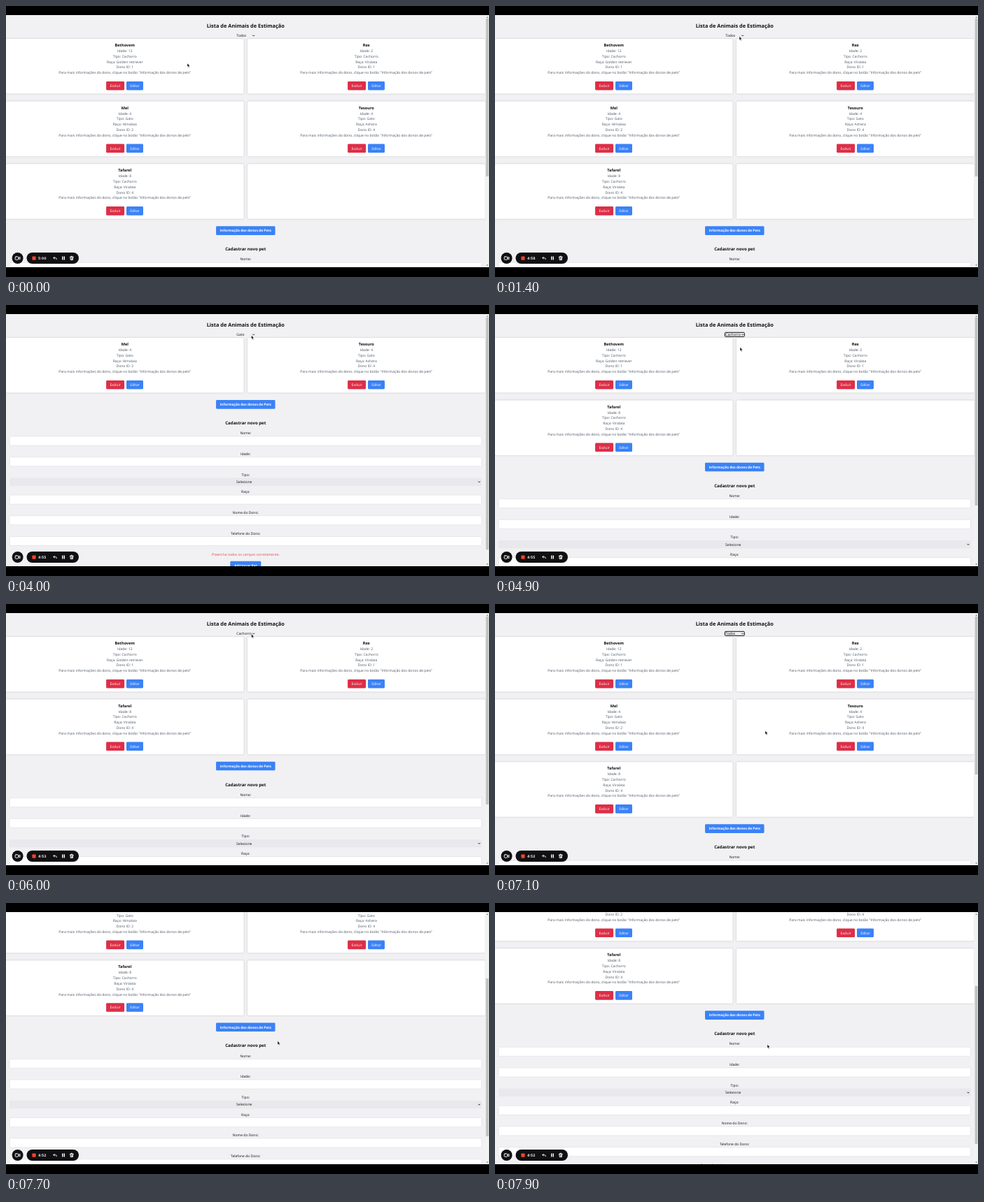
Animation, 690 px wide and 388 px high, one loop 8000 ms. Source, as an HTML page:

```html
<!DOCTYPE html>
<html lang="pt-BR">
<head>
<meta charset="utf-8">
<title>Lista de Animais de Estimação</title>
<style>
  html, body { margin: 0; width: 100%; height: 100%; overflow: hidden; background: #000; }
  svg { display: block; width: 100vw; height: 100vh; }
  text { font: 5px "Open Sans", "Noto Sans", sans-serif; text-anchor: middle; text-rendering: geometricPrecision; fill: #111; white-space: pre; }
  .title { font-size: 7.4px; font-weight: 700; }
  .heading { font-size: 6.12px; font-weight: 700; }
  .name { font-size: 5.6px; font-weight: 700; }
  .detail { fill: #4b5563; }
  .light { fill: #fff; }
  .strong { fill: #fff; font-size: 4.9px; font-weight: 700; }
  .error { fill: #ef4444; }
  .left { text-anchor: start; }
  .card { fill: #fff; filter: drop-shadow(0 .6px .9px rgba(0, 0, 0, .2)); }
  .field { fill: #fff; stroke: #d4d6dc; stroke-width: .5; }
  .clock { font: 700 5px Inter, sans-serif; fill: #fff; text-anchor: start; }
  .icon { fill: none; stroke: #fff; stroke-width: .9; stroke-linecap: round; stroke-linejoin: round; }
  .chevron { fill: none; stroke: #111; stroke-width: .9; }
</style>
</head>
<body>
<svg id="stage" viewBox="0 0 690 388" xmlns="http://www.w3.org/2000/svg"></svg>
<script>
const LOOP = 8000, STEP = 100;
const VIEW = { top: 13, height: 361 }, TRACK = { top: 18, height: 351 };
const ROW = 89.6, BLUE = '#3b82f6', RED = '#dc2f47';
const stage = document.getElementById('stage');

const pets = [
  ['Bethovem', 12, 'Cachorro', 'Golden retriever', 1],
  ['Rex', 2, 'Cachorro', 'Viralata', 1],
  ['Mel', 4, 'Gato', 'Himalaia', 2],
  ['Tesouro', 4, 'Gato', 'Ashera', 4],
  ['Tafarel', 8, 'Cachorro', 'Viralata', 4]
];

function add(parent, tag, attrs = {}, content) {
  const node = document.createElementNS(stage.namespaceURI, tag);
  for (const key in attrs) node.setAttribute(key, attrs[key]);
  if (content !== undefined) node.textContent = content;
  parent.append(node);
  return node;
}
const box = (parent, x, y, width, height, attrs) =>
  add(parent, 'rect', { x, y, width, height, ...attrs });
const path = (parent, d, attrs) => add(parent, 'path', { d, ...attrs });
const label = (parent, x, y, content, cls = '') => {
  const drop = { title: 2.7, heading: 2.2, name: 2 }[cls] || 1.8;
  return add(parent, 'text', { x, y: y + drop, class: cls }, content);
};
const chevron = (parent, x, y) =>
  path(parent, `M${x - 1.4} ${y - .7}l1.4 1.4l1.4-1.4`, { class: 'chevron' });

function button(parent, x, y, width, content, fill, cls = 'light') {
  box(parent, x - width / 2, y - 6.3, width, 12.6, { rx: 1.4, fill });
  label(parent, x, y, content, cls);
}

function card(parent, index, pet) {
  const left = index % 2 * 345, top = 47 + Math.floor(index / 2) * ROW;
  const middle = left + 169.8;
  box(parent, left, top, 339.6, 78.6, { rx: 1.6, class: 'card' });
  if (!pet) return;
  const [name, age, type, breed, owner] = pet;
  label(parent, middle, top + 9.1, name, 'name');
  [`Idade: ${age}`, `Tipo: ${type}`, `Raça: ${breed}`, `Dono ID: ${owner}`,
    'Para mais informações do dono, clique no botão "Informação dos donos de pets"'
  ].forEach((line, i) => label(parent, middle, top + 17.2 + i * 7.8, line, 'detail'));
  button(parent, middle - 13.7, top + 67.2, 26, 'Excluir', RED);
  button(parent, middle + 14.2, top + 67.2, 24, 'Editar', BLUE);
}

function form(parent, y) {
  const middle = 342.3;
  button(parent, middle, y, 84.5, 'Informação dos donos de Pets', BLUE, 'strong');
  label(parent, middle, y + 26.5, 'Cadastrar novo pet', 'heading');
  [['Nome:', 41], ['Idade:', 70.7], ['Raça:', 125], ['Nome do Dono:', 154.6], ['Telefone do Dono:', 184.4]]
    .forEach(([content, offset]) => {
      label(parent, middle, y + offset, content);
      box(parent, 5.2, y + offset + 4.7, 674.2, 13, { rx: 1.2, class: 'field' });
    });
  label(parent, middle, y + 100.4, 'Tipo:');
  box(parent, 5, y + 105, 674.6, 11.6, { rx: 1.2, fill: '#e9e9ed' });
  label(parent, 340.2, y + 110.7, 'Selecione');
  chevron(parent, 676, y + 110.8);
  label(parent, middle, y + 214.4, 'Preencha todos os campos corretamente.', 'error');
  button(parent, middle, y + 230.6, 44, 'Adicionar Pet', BLUE, 'strong');
}

function buildPage(filter) {
  const group = add(scroller, 'g');
  const shown = pets.filter(pet => filter === 'Todos' || pet[2] === filter);
  const rows = Math.ceil(shown.length / 2);
  const formTop = 142.4 + (rows - 1) * ROW;
  label(group, 342.3, 28.3, 'Lista de Animais de Estimação', 'title');
  for (let i = 0; i < rows * 2; i++) card(group, i, shown[i]);
  label(group, 329.3, 42.2, filter, 'left');
  chevron(group, 353.6, 42.4);
  form(group, formTop);
  return { group, height: formTop + 252 - VIEW.top };
}

function buildRecorder() {
  const group = add(stage, 'g');
  add(group, 'circle', { cx: 16.6, cy: 361, r: 8, fill: '#101012' });
  box(group, 13.2, 358.9, 4.6, 4.4, { rx: 1, class: 'icon' });
  path(group, 'M17.9 360.6l2.1-1.2v3.4l-2.1-1.2', { class: 'icon' });
  box(group, 29.5, 353, 74.5, 16, { rx: 8, fill: '#101012' });
  box(group, 37.4, 358.5, 5.2, 5.2, { rx: .8, fill: '#f0442e' });
  path(group, 'M69.3 359.2l-1.5 1.5l1.5 1.5M68 360.7h2.7q1.7 0 1.7 2', { class: 'icon' });
  box(group, 80.1, 358.5, 1.4, 5, { fill: '#fff' });
  box(group, 82.6, 358.5, 1.4, 5, { fill: '#fff' });
  path(group, 'M91.3 359.4h5M92.8 359.2v-.9h2v.9M91.9 359.6l.3 4h3.2l.3-4M93.2 361v1.5M94.4 361v1.5', { class: 'icon' });
  return add(group, 'text', { x: 46, y: 362.8, class: 'clock' });
}

box(stage, 0, 0, 690, 388, { fill: '#f1f1f4' });
const scroller = add(stage, 'g');
const pages = Object.fromEntries(['Todos', 'Gato', 'Cachorro'].map(f => [f, buildPage(f)]));
const ring = box(scroller, 328.4, 39.3, 27.9, 6, { rx: 1, fill: 'none', stroke: '#111', 'stroke-width': 1 });
box(stage, 685.1, 13, 4.9, 361, { fill: '#f2f2f3' });
const thumb = box(stage, 685.6, TRACK.top, 3.9, 0, { fill: '#c1c1c3' });
path(stage, 'M686.2 16.8l1.4-1.6l1.4 1.6z', { fill: '#666' });
path(stage, 'M686.2 370.4l1.4 1.6l1.4-1.6z', { fill: '#666' });
box(stage, 0, 0, 690, 13);
box(stage, 0, 374, 690, 14);
const clock = buildRecorder();
const cursor = path(stage, 'M0 0v5.2l1.2-1l.9 2l1-.45l-.9-1.9h1.6z',
  { fill: '#000', stroke: '#fff', 'stroke-width': .5 });

// Each row: time, then values eased towards the next row.
const cursorPath = [
  [0, 259, 82], [100, 261, 81], [900, 349, 43.5], [1799, 349, 43.5],
  [1800, 350, 70], [2600, 350.5, 44], [2800, 350.5, 43.5], [4899, 350.5, 43.5],
  [4900, 350, 60.5], [5500, 350.5, 43], [6399, 350.5, 43],
  [6400, 350, 54], [7100, 386, 181.5], [7300, 385, 183.5], [7900, 389, 202.5]
];
const scrollPath = [[0, 0], [7100, 0], [7300, 95], [7900, 161]];
const filters = [[0, 'Todos'], [1800, 'Gato'], [4900, 'Cachorro'], [6400, 'Todos']];
const focus = [[0, false], [1800, true], [3300, false], [4900, true], [5700, false], [6400, true]];
const seconds = [[0, 300], [100, 299], [1000, 298], [2000, 297], [3000, 296],
  [4000, 295], [5000, 294], [6000, 293], [7000, 292]];

const current = (steps, t) => steps.findLast(step => step[0] <= t)[1];
function along(points, t) {
  const next = points.findIndex(point => point[0] > t);
  if (next < 0) return points.at(-1).slice(1);
  const from = points[next - 1], to = points[next];
  const p = (t - from[0]) / (to[0] - from[0]), eased = p * p * (3 - 2 * p);
  return from.slice(1).map((value, i) => value + (to[i + 1] - value) * eased);
}

function draw(t) {
  const filter = current(filters, t);
  for (const key in pages) pages[key].group.style.display = key === filter ? '' : 'none';
  ring.style.display = current(focus, t) ? '' : 'none';

  const [scroll] = along(scrollPath, t), { height } = pages[filter];
  scroller.setAttribute('transform', `translate(0 ${-scroll})`);
  thumb.setAttribute('y', TRACK.top + scroll * TRACK.height / height);
  thumb.setAttribute('height', TRACK.height * VIEW.height / height);

  const left = current(seconds, t);
  clock.textContent = `${Math.floor(left / 60)}:${String(left % 60).padStart(2, '0')}`;
  cursor.setAttribute('transform', `translate(${along(cursorPath, t).join(' ')})`);
}

const start = performance.now();
function tick() {
  const t = (performance.now() - start) % LOOP;
  draw(Math.floor(t / STEP) * STEP);
  requestAnimationFrame(tick);
}
tick();
</script>
</body>
</html>
```
